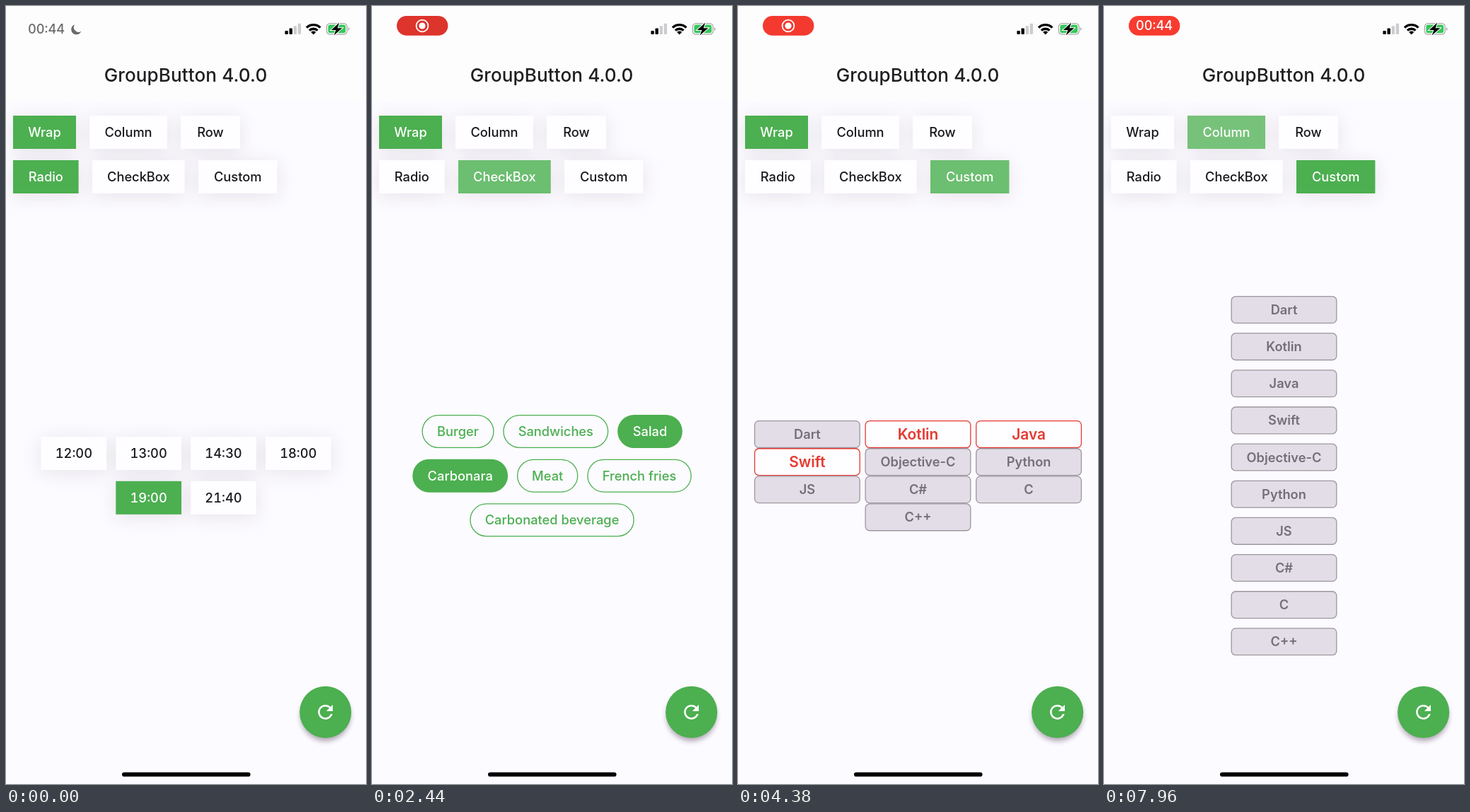
An HTML page for the animation above (8 s loop, 509 px wide and 1100 px high).

```html
<!DOCTYPE html>
<html lang="en">
<head>
<meta charset="utf-8">
<title>GroupButton 4.0.0</title>
<style>
  html, body { margin: 0; width: 100%; height: 100%; overflow: hidden; background: #fcfbff; }
  body > svg { display: block; width: 100vw; height: 100vh; }
  text { font: 500 18.27px Inter, "Open Sans", sans-serif; text-anchor: middle; }
  .num { font-variant-numeric: tabular-nums; }
</style>
</head>
<body>
<svg id="stage" viewBox="0 0 509 1100">
  <defs>
    <filter id="soft" filterUnits="userSpaceOnUse" x="-80" y="60" width="680" height="800">
      <feGaussianBlur stdDeviation="14"/>
    </filter>
    <filter id="tight" x="-50%" y="-50%" width="200%" height="200%">
      <feGaussianBlur stdDeviation="3.5"/>
    </filter>
    <filter id="edge" x="-10%" y="-30%" width="120%" height="160%">
      <feGaussianBlur stdDeviation="1"/>
    </filter>
  </defs>
  <rect width="509" height="1100" fill="#fcfbff"/>
  <g id="menu"></g>
  <g id="pages"></g>
  <rect width="509" height="134.5" fill="#fdfdfe"/>
  <text x="254" y="106.5" fill="#1f1f21" style="font-size:26.1px;letter-spacing:.1px">GroupButton 4.0.0</text>

  <g id="clock" fill="#6a6a6c">
    <text class="num" x="57" y="39">00:44</text>
    <path d="M97 26.2a7.3 7.3 0 1 0 9.3 9.5a6.8 6.8 0 0 1-9.3-9.5z"/>
  </g>
  <g id="pill">
    <rect id="pillBg" x="35" y="14" width="72.4" height="27.8" rx="13.9"/>
    <g id="rec">
      <circle cx="71" cy="28" r="8.4" fill="none" stroke="#fff" stroke-width="1.8"/>
      <circle cx="71" cy="28" r="4.6" fill="#fff"/>
    </g>
    <text id="recTime" class="num" x="71" y="34.4" fill="#fff">00:44</text>
  </g>

  <g id="signal"></g>
  <g fill="none" stroke="#000" stroke-width="3.4">
    <path d="M425 30.6a13.8 13.8 0 0 1 19.4 0"/>
    <path d="M428.9 34.6a8.2 8.2 0 0 1 11.6 0"/>
  </g>
  <path d="M434.7 40.6l-3.5-3.6a5 5 0 0 1 7 0z"/>
  <rect x="453.4" y="24.6" width="28.8" height="15.6" rx="4.8" fill="#fff" stroke="#a9a9ac" stroke-width="1.3"/>
  <rect x="455.4" y="26.6" width="24.8" height="11.6" rx="3" fill="#34c759"/>
  <path d="M483.8 30v5q1.8-.8 1.8-2.5t-1.8-2.5z" fill="#a9a9ac"/>
  <path d="M471.2 23.6l-11.4 10.3h6.6l-2.8 7.7 11.8-10.4h-6.7z" stroke="#fff" stroke-width="2" paint-order="stroke"/>

  <ellipse cx="451.7" cy="1004" rx="35.5" ry="35.5" fill="#301838" opacity=".36" filter="url(#tight)"/>
  <circle cx="451.7" cy="998.4" r="36.6" fill="#4caf50"/>
  <path transform="translate(435.9 982.7) scale(1.305)" fill="#fff" d="M17.65 6.35C16.2 4.9 14.21 4 12 4c-4.42 0-7.99 3.58-7.99 8s3.57 8 7.99 8c3.73 0 6.84-2.55 7.73-6h-2.08c-.82 2.33-3.04 4-5.65 4-3.31 0-6-2.69-6-6s2.69-6 6-6c1.66 0 3.14.69 4.22 1.78L13 11h7V4l-2.35 2.35z"/>
  <rect x="164" y="1083.4" width="181.6" height="6.2" rx="3.1"/>
</svg>
<script>
const LOOP = 8000, W = 509, H = 47;
const GREEN = '#4caf50', RED = '#e53a31', LIGHT = '#fefdff', INK = '#19191b';
const $ = id => document.getElementById(id);

function el(parent, tag, attrs = {}, text) {
  const node = document.createElementNS('http://www.w3.org/2000/svg', tag);
  for (const k in attrs) node.setAttribute(k, attrs[k]);
  if (text) node.textContent = text;
  return parent.appendChild(node);
}
const set = (node, attrs) => { for (const k in attrs) node.setAttribute(k, attrs[k]); };
const clamp = x => Math.max(0, Math.min(1, x));
const ramp = (t, from, to) => clamp((t - from) / (to - from));

// Cubic Bezier ease-in-out (0.42, 0, 0.58, 1)
function easeInOut(x) {
  let lo = 0, hi = 1;
  for (let i = 0; i < 20; i++) {
    const s = (lo + hi) / 2, q = 1 - s;
    if (3 * q * q * s * .42 + 3 * q * s * s * .58 + s ** 3 < x) lo = s; else hi = s;
  }
  return lo * lo * (3 - 2 * lo);
}

// Piecewise linear curve through [time, value] points
function curve(t, pts) {
  if (t < pts[0][0]) return 0;
  for (let i = 1; i < pts.length; i++) {
    const [t0, v0] = pts[i - 1], [t1, v1] = pts[i];
    if (t < t1) return v0 + (v1 - v0) * (t - t0) / (t1 - t0);
  }
  return pts[pts.length - 1][1];
}

// Square buttons with a shared wide shadow; items are [label, x, y, width]
function buttons(parent, items, cls = '') {
  const shade = el(parent, 'g', { filter: 'url(#soft)', fill: '#3c1e46', opacity: .11 });
  for (const [, x, y, w] of items) el(shade, 'rect', { x, y: y + 4, width: w, height: H });
  return items.map(([label, x, y, w]) => {
    const lift = el(parent, 'rect', { x, y: y + 1.3, width: w, height: H, fill: '#000', opacity: 0, filter: 'url(#edge)' });
    const box = el(parent, 'rect', { x, y, width: w, height: H });
    const clip = el(parent, 'svg', { x, y, width: w, height: H, overflow: 'hidden' });
    const ink = el(clip, 'circle', { fill: '#fff', opacity: 0 });
    const text = el(parent, 'text', { x: x + w / 2, y: y + 30, class: cls }, label);
    return { x, y, lift, box, ink, text };
  });
}
function select(btn, on) {
  set(btn.box, { fill: on ? GREEN : LIGHT });
  set(btn.text, { fill: on ? '#fff' : INK });
}

function chip(parent, [label, x, y, w, on]) {
  el(parent, 'rect', {
    x: x + .65, y: y + .65, width: w - 1.3, height: H - 1.3, rx: 22.8,
    fill: on ? GREEN : 'none', stroke: GREEN, 'stroke-width': 1.3
  });
  el(parent, 'text', { x: x + w / 2, y: y + 30, fill: on ? '#fff' : GREEN }, label);
}

function tile(parent, label, x, y, on) {
  el(parent, 'rect', {
    x: x + .65, y: y + .65, width: 148.7, height: 37.8, rx: 6,
    fill: on ? '#fefdff' : '#e2dde6', stroke: on ? RED : '#9d969f', 'stroke-width': 1.3
  });
  el(parent, 'text', {
    x: x + 75, y: y + (on ? 27 : 26), fill: on ? RED : '#747076',
    style: `font-weight:600;font-size:${on ? 20.9 : 18.27}px`
  }, label);
}

const menu = buttons($('menu'), [
  ['Wrap', 10, 155, 89], ['Column', 118, 155, 110], ['Row', 247, 155, 84],
  ['Radio', 10, 218, 92.6], ['CheckBox', 122, 218, 130.7], ['Custom', 272, 218, 111.4]
]);

const pages = [0, 1, 2].map(() => el($('pages'), 'g'));
const hours = ['12:00', '13:00', '14:30', '18:00', '19:00', '21:40'];
buttons(pages[0], hours.map((h, i) => [h, 49.5 + 105.8 * (i < 4 ? i : i - 3), i < 4 ? 609 : 671.8, 92.7]), 'num')
  .forEach((b, i) => select(b, i === 4));

[
  ['Burger', 70.5, 578, 102], ['Sandwiches', 185.3, 578, 149], ['Salad', 347.2, 578, 91.6, true],
  ['Carbonara', 57.3, 640.7, 134.8, true], ['Meat', 205, 640.7, 86.4], ['French fries', 304.3, 640.7, 147.5],
  ['Carbonated beverage', 138.3, 703.3, 232.5]
].forEach(c => chip(pages[1], c));

const langs = ['Dart', 'Kotlin', 'Java', 'Swift', 'Objective-C', 'Python', 'JS', 'C#', 'C', 'C++'];
const grid = el(pages[2], 'g'), list = el(pages[2], 'g');
langs.forEach((name, i) => {
  const col = i === 9 ? 1 : i % 3;
  tile(grid, name, 22.9 + 156.6 * col, 586 + 39.1 * Math.floor(i / 3), i > 0 && i < 4);
  tile(list, name, 179.5, 409.9 + 52.15 * i, false);
});

for (let i = 0; i < 4; i++) {
  const h = 5 + 3.4 * i;
  el($('signal'), 'rect', { x: 394.4 + 6.1 * i, y: 40 - h, width: 4.4, height: h, rx: 1, fill: i < 2 ? '#000' : '#cdcdcf' });
}

const taps = [
  { btn: 4, at: 1690, x: 207, y: 242 },
  { btn: 5, at: 3760, x: 333, y: 238 },
  { btn: 1, at: 7660, x: 185, y: 180 }
];
const inkFade = [[0, .06], [160, .26], [300, .24], [450, .18], [750, .18], [1150, 0]];
const liftFade = [[-110, 0], [-60, .3], [160, .3], [300, 0]];

function render(t) {
  const layout = t < taps[2].at ? 0 : 1;
  const mode = t < taps[0].at ? 3 : t < taps[1].at ? 4 : 5;
  menu.forEach((b, i) => select(b, i === layout || i === mode));
  for (const tap of taps) {
    const b = menu[tap.btn], dt = t - tap.at;
    set(b.ink, { cx: tap.x - b.x, cy: tap.y - b.y, r: Math.max(0, 18 + .225 * dt), opacity: curve(dt, inkFade) });
    set(b.lift, { opacity: curve(dt, liftFade) });
  }

  const pos = easeInOut(ramp(t, 1700, 2200)) + easeInOut(ramp(t, 3760, 4260));
  pages.forEach((p, i) => set(p, {
    transform: `translate(${(i - pos) * W} 0)`,
    display: Math.abs(i - pos) < 1 ? 'inline' : 'none'
  }));
  set(grid, { display: layout ? 'none' : 'inline' });
  set(list, { display: layout ? 'inline' : 'none' });

  const show = easeInOut(ramp(t, 450, 850)), size = .8 + .2 * show;
  set($('clock'), { opacity: 1 - ramp(t, 450, 650) });
  set($('pill'), { opacity: show, transform: `translate(71 28) scale(${size}) translate(-71 -28)` });
  const glow = ((1 + Math.cos((t - 3920) / 3690 * 2 * Math.PI)) / 2) ** 2.5;
  const mix = (a, b) => Math.round(a + (b - a) * glow);
  set($('pillBg'), { fill: `rgb(${mix(221, 255)},${mix(52, 59)},${mix(44, 48)})` });
  const swap = ramp(t, 5300, 5600);
  set($('rec'), { opacity: 1 - swap });
  set($('recTime'), { opacity: swap });
}

const start = performance.now();
function frame() {
  render((performance.now() - start) % LOOP);
  requestAnimationFrame(frame);
}
render(0);
requestAnimationFrame(frame);
</script>
</body>
</html>
```
